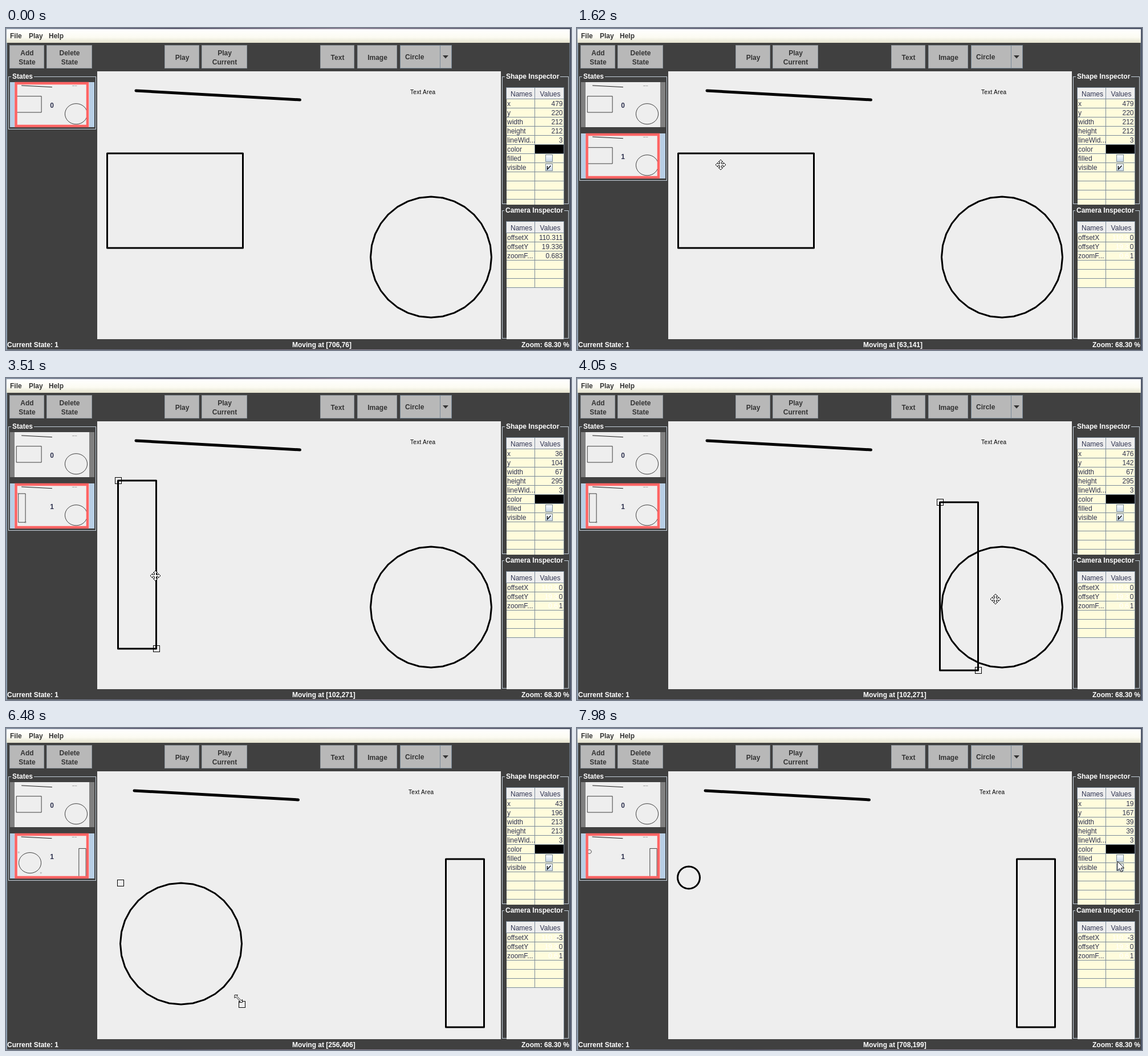
These frames come from a looping animation (991 by 565 pixels, 8000 ms). An HTML page:

```html
<!DOCTYPE html>
<html lang="en">
<head>
<meta charset="utf-8">
<title>Shape editor</title>
<style>
html, body { margin: 0; width: 100%; height: 100%; overflow: hidden; background: #404040; }
svg { display: block; width: 100vw; height: 100vh; }
text { font: 12px "Liberation Sans", Arial, sans-serif; white-space: pre; }
.b { font-weight: bold; }
</style>
</head>
<body>
<svg viewBox="0 0 991 565" preserveAspectRatio="none">
  <defs>
    <linearGradient id="desk"><stop offset="0" stop-color="#8a97a8"/><stop offset=".3" stop-color="#5c5a70"/><stop offset=".6" stop-color="#94899c"/><stop offset="1" stop-color="#4c5468"/></linearGradient>
    <linearGradient id="menu" x2="0" y2="1"><stop offset="0" stop-color="#fff"/><stop offset=".6" stop-color="#fcfbf2"/><stop offset="1" stop-color="#e4e2ce"/></linearGradient>
    <linearGradient id="box" x2="0" y2="1"><stop offset="0" stop-color="#fff"/><stop offset="1" stop-color="#c4d6e8"/></linearGradient>
    <clipPath id="stage"><rect x="160" y="76" width="708" height="470"/></clipPath>
    <clipPath id="view"><rect x="870" y="76" width="121" height="234"/></clipPath>
  </defs>
  <g id="base"></g>
  <g id="live"></g>
</svg>
<script>
const LOOP = 8000, STEP = 30, ADDED = 1380;
const DARK = '#404040', PALE = '#eeeeee', INK = '#333333', NAVY = '#2f3350';
const SLATE = '#7a8a99', SKY = '#b8cfe5', CREAM = '#fffcdc', EDGE = '#c3cfda';

// ---------- drawing helpers ----------
const fill = (x, y, w, h, c) => `<rect x="${x}" y="${y}" width="${w}" height="${h}" fill="${c}"/>`;
const frame = (x, y, w, h, c, bg = 'none') =>
  `<rect x="${x + .5}" y="${y + .5}" width="${w - 1}" height="${h - 1}" fill="${bg}" stroke="${c}"/>`;
const path = (d, c, w = 1, bg = 'none') => `<path d="${d}" stroke="${c}" stroke-width="${w}" fill="${bg}"/>`;
const text = (x, y, s, c = NAVY, anchor = 'start', cls = '') =>
  `<text x="${x}" y="${y}" fill="${c}" text-anchor="${anchor}" class="${cls}">${s}</text>`;
const bold = (x, y, s, c = INK, anchor = 'start') => text(x, y, s, c, anchor, 'b');

// ---------- the user's gestures ----------
// Each one takes the pointer from where it is to (x, y) between two times.
const ENTRY = [971, 158];
const gestures = [];
function gesture(act, part, start, end, x, y) {
  const from = gestures.length ? gestures[gestures.length - 1].to : ENTRY;
  gestures.push({ act, part, start, end, from, to: [x, y] });
}
const go = (...a) => gesture('go', '', ...a);
const move = (...a) => gesture('move', ...a);
const size = (...a) => gesture('size', ...a);
const pan = (...a) => gesture('pan', '', ...a);
const leave = (...a) => gesture('leave', '', ...a);

go(240, 1020, 32, 63);
go(1390, 1620, 252, 240);
go(1620, 1740, 270, 232);
move('rect', 1740, 2040, 289, 192);
go(2040, 2160, 402, 331);
go(2160, 2520, 435, 347);
size('rect', 2760, 2790, 409, 373);
size('rect', 2790, 3270, 264, 475);
go(3270, 3450, 262, 347);
move('rect', 3570, 4230, 840, 397);
go(4230, 4290, 769, 463);
move('circle', 4410, 4800, 333, 439);
go(4800, 4980, 408, 487);
pan(5520, 5700, 405, 487);
go(5700, 6000, 352, 441);
go(6000, 6300, 416, 482);
size('circle', 6450, 7140, 240, 311);
go(7140, 7230, 215, 290);
move('circle', 7290, 7530, 191, 261);
leave(7680, 7890, 868, 275);
go(7890, 7980, 948, 234);

const isDrag = g => Boolean(g.part) || g.act === 'pan';
const current = t => gestures.filter(g => g.start <= t).pop();
const dragging = t => gestures.some(g => isDrag(g) && t > g.start && t <= g.end);

function along(g, t) {
  const span = g.end - g.start;
  let p = Math.min(1, (t - g.start) / span);
  if (g.act !== 'size' && span >= 300) p = p * p * (3 - 2 * p);
  return g.from.map((v, i) => v + (g.to[i] - v) * p);
}

const pointer = t => {
  const g = current(t);
  return g ? along(g, t) : ENTRY;
};
const onStage = ([x, y]) => x >= 160 && x <= 868 && y >= 76 && y <= 546;

// Replays every drag up to time t.
function pose(t) {
  const s = {
    rect: { x: 17, y: 144, w: 238, h: 166 }, circle: { x: 479, y: 220, w: 212, h: 212 },
    picked: null, pan: 0
  };
  s.shown = s.circle;
  for (const g of gestures) {
    if (g.start > t) break;
    const [x, y] = along(g, t), dx = x - g.from[0], dy = y - g.from[1], b = s[g.part];
    if (b) s.picked = s.shown = b;
    if (g.act === 'leave') s.picked = null;
    if (g.act === 'pan') s.pan = Math.round(dx);
    if (g.act === 'move') {
      b.x = Math.round(b.x + dx);
      b.y = Math.round(b.y + dy);
    }
    if (g.act === 'size') {
      b.w = Math.round(x - 161 - s.pan - b.x);
      b.h = Math.round(y - 76 - b.y);
      if (b === s.circle) b.w = b.h = Math.round((b.w + b.h) / 2);
    }
  }
  return s;
}

// The thumbnail is refreshed whenever the pointer sets off freely.
function savedPose(t) {
  const g = gestures.filter(g => g.start <= t && !isDrag(g)).pop();
  return pose(g ? g.start : 0);
}

// Last free pointer position over the stage, as the status line reports it.
function reported(t) {
  for (let s = t - STEP; s >= 240; s -= STEP) {
    if (!dragging(s) && onStage(pointer(s))) return pointer(s);
  }
  return [866, 152];
}

// ---------- scene ----------
function ring({ x, y, w }) {
  const r = w / 2, sides = 32;
  const points = Array.from({ length: sides }, (_, i) => {
    const a = i / sides * 2 * Math.PI;
    return `${(x + r + r * Math.cos(a)).toFixed(2)},${(y + r + r * Math.sin(a)).toFixed(2)}`;
  });
  return `<polygon points="${points.join(' ')}"/>`;
}

function shapes({ rect: r, circle: c, picked: p, pan }, weight = 3) {
  const handle = (x, y) => `<rect x="${x - 5}" y="${y - 5}" width="11" height="11"/>`;
  return `<g transform="translate(${pan})">
    <path d="M228 110L515.5 126" stroke="#000" stroke-width="5" stroke-linecap="round"/>
    <text x="709" y="116" style="font-size:10px;letter-spacing:.3px">Text Area</text>
    <g transform="translate(160.5 76)" fill="none" stroke="#000" stroke-width="${weight}" stroke-linejoin="round">
      <rect x="${r.x}" y="${r.y}" width="${r.w}" height="${r.h}"/>${ring(c)}
      <g stroke-width="1" stroke-linejoin="miter">${p ? handle(p.x, p.y - .5) + handle(p.x + p.w, p.y + p.h - .5) : ''}</g>
    </g></g>`;
}

function thumb(n, scene, selected) {
  const y = 95 + 90 * n;
  return fill(7, y, 148, 79, selected ? SKY : '#808080') +
    `<svg x="15" y="${y}" width="131" height="79" viewBox="0 0 131 79">${fill(0, 0, 131, 79, PALE)}
      <g transform="scale(.1845 .1705) translate(-160 -75)">${shapes(scene, 4.2)}</g></svg>` +
    (selected ? path(`M17.5 ${y + 2}H143V${y + 77}H17.5Z`, '#ff6464', 4.5) : '') +
    bold(80.5, y + 45, n, NAVY, 'middle');
}

const checkbox = (y, on) => frame(946, y, 13, 13, SLATE, 'url(#box)') +
  (on ? path(`M949.5 ${y + 4}V${y + 10}L955.5 ${y + 3.5}`, '#111', 1.4) : '');

const ARROW = 'M0 0V16L3.7 12.6L6.3 18.5L8.8 17.4L6.3 11.8H11.5Z';
const STRETCH = 'M-7 -6.5H-1.5L-3.3 -4.7L4.7 3.3L6.5 1.5V6.5H1.2L3 4.8L-5 -3.2L-7 -1.2Z';
const CROSS = 'M-1.5 -1.5V-5H-4L0 -9L4 -5H1.5V-1.5H5V-4L9 0L5 4V1.5H1.5V5H4L0 9L-4 5H-1.5V1.5H-5V4L-9 0L-5 -4V-1.5Z';

function cursor(t, s) {
  const p = pointer(t), [x, y] = p.map(Math.round), g = current(t);
  const inside = b => {
    const dx = x - 161 - s.pan - b.x, dy = y - 76 - b.y;
    return dx >= -3 && dy >= -3 && dx <= b.w + 3 && dy <= b.h + 3;
  };
  const k = s.picked;
  const atHandle = k && Math.hypot(x - 161 - s.pan - k.x - k.w, y - 76 - k.y - k.h) < 12;
  let d = ARROW;
  if (atHandle || (g.act === 'size' && t <= g.end)) d = STRETCH;
  else if (onStage(p) && (inside(s.rect) || inside(s.circle))) d = CROSS;
  return `<g transform="translate(${x} ${y})">${path(d, '#111', 1, '#fff')}</g>`;
}

function drawLive(t) {
  const added = t >= ADDED;
  const s = pose(t - STEP); // shapes trail the pointer by one step
  const [px, py] = reported(t).map(Math.round);
  let out = `<g clip-path="url(#stage)">${shapes(s)}</g>`;

  out += titled(4, 85, 154, added ? 183 : 93, 'States', 11, 36);
  out += thumb(0, pose(0), !added) + (added ? thumb(1, savedPose(t), true) : '');

  const b = s.shown;
  [b.x, b.y, b.w, b.h, 3].forEach((v, i) => out += text(976.5, 137 + 16 * i, v, NAVY, 'end'));
  const start = ['110.311', '19.336', '0.683'];
  (added ? [s.pan, 0, 1] : start).forEach((v, i) => {
    const y = 372 + 16 * i;
    if (added) out += text(968, y, start[i].slice(0, -2), '#fff', 'end');
    out += text(976.5, y, v, NAVY, 'end');
  });

  out += bold(502, 560, `Moving at [${px - 160},${py - 76}]`, '#fff');
  if (t >= 960 && t < ADDED) out += frame(7, 31, 59, 39, SKY);
  if (t >= 240) out += cursor(t, s);
  return out;
}

// ---------- fixed parts ----------
function button(x, w, ...lines) {
  const y = lines.length > 1 ? 48 : 56;
  return frame(x, 30, w, 41, '#8f979e', '#b8b8b8') +
    lines.map((s, i) => bold(x + w / 2 + .5, y + 16 * i, s, INK, 'middle')).join('');
}

function titled(x, y, w, h, title, tx, tw) {
  return frame(x, y, w, h, EDGE) + fill(tx - 2, y - 3, tw + 4, 7, DARK) + bold(tx, y + 4, title, '#fff');
}

function table(y, names, rows, bottom) {
  let out = fill(878, y, 101, bottom - y, PALE) + frame(877, y - 1, 51, 21, SLATE, PALE) + frame(927, y - 1, 52, 21, SLATE, PALE);
  out += text(904, y + 15, 'Names', NAVY, 'middle') + text(954.5, y + 15, 'Values', NAVY, 'middle');
  const top = y + 20;
  out += fill(878, top, 100, 16 * rows, CREAM);
  for (let i = 0; i < rows; i++) {
    out += fill(878, top + 15 + 16 * i, 101, 1, SLATE);
    if (names[i]) out += text(879, top + 12 + 16 * i, names[i]);
  }
  return out + fill(927, top, 1, 16 * rows, SLATE) + fill(978, y, 1, bottom - y, SLATE);
}

function drawBase() {
  return fill(0, 0, 991, 565, 'url(#desk)') + fill(1, 2, 988, 562, DARK) + fill(1, 2, 988, 24, 'url(#menu)') +
    fill(1, 26, 1, 538, '#8fa3b5') + fill(988, 26, 1, 520, '#68737d') +
    bold(7, 18, 'File') + bold(40, 18, 'Play') + bold(75, 18, 'Help') +
    button(6, 61, 'Add', 'State') + button(71, 80, 'Delete', 'State') +
    button(278, 61, 'Play') + button(343, 80, 'Play', 'Current') +
    button(551, 60, 'Text') + button(616, 70, 'Image') +
    frame(691, 30, 91, 41, SLATE, '#b8b8b8') + bold(700, 55, 'Circle') +
    fill(761, 31, 1, 39, SLATE) + path('M766 48H776L771 53.5Z', 'none', 0, INK) +
    fill(160, 76, 708, 470, PALE) +
    titled(870, 85, 117, 224, 'Shape Inspector', 877, 93) +
    titled(870, 320, 117, 225, 'Camera Inspector', 876, 101) +
    `<g clip-path="url(#view)">${table(105, ['x', 'y', 'width', 'height', 'lineWid...', 'color', 'filled', 'visible'], 12, 310)}</g>` +
    fill(928, 205, 50, 15, '#000') + checkbox(222, false) + checkbox(238, true) +
    table(340, ['offsetX', 'offsetY', 'zoomF...'], 6, 546) +
    bold(2, 560, 'Current State: 1', '#fff') + bold(988, 560, 'Zoom: 68.30 %', '#fff', 'end');
}

const live = document.getElementById('live');
document.getElementById('base').innerHTML = drawBase();
const begun = performance.now();
let last = -1;
function tick() {
  const t = Math.floor(((performance.now() - begun) % LOOP) / STEP) * STEP;
  if (t !== last) live.innerHTML = drawLive(last = t);
  requestAnimationFrame(tick);
}
tick();
</script>
</body>
</html>
```
